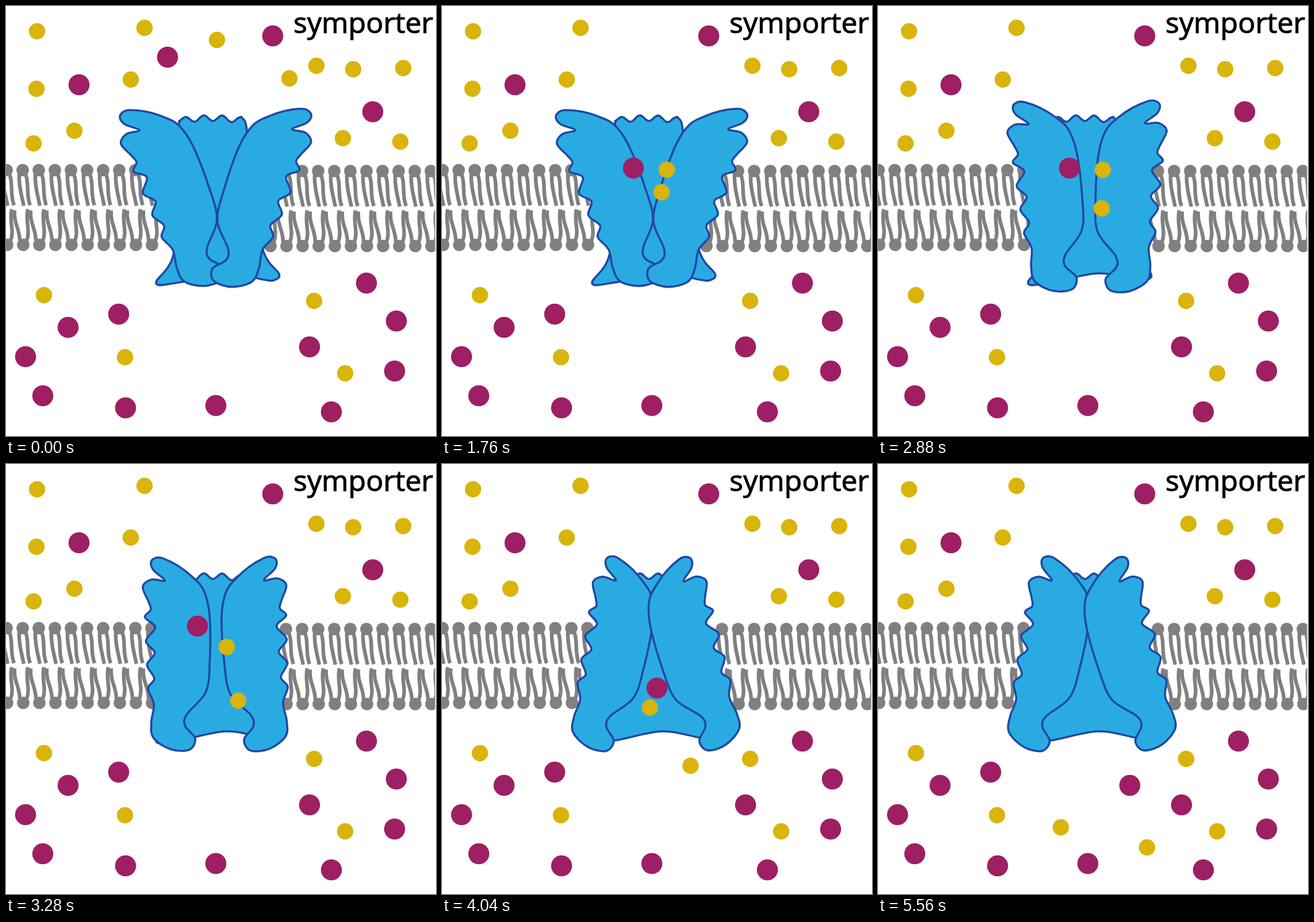
Recreate the animation shown at these times as an HTML page. Size 748x748 px, loop 6960 ms.

```html
<!DOCTYPE html>
<html lang="en">
<head>
<meta charset="utf-8">
<title>Symporter</title>
<style>
  html, body { margin: 0; width: 100%; height: 100%; overflow: hidden; background: #fff; }
  svg { display: block; width: 100%; height: 100%; }
  .protein path { fill: #29abe2; stroke: #1f48a3; stroke-width: 3.6; stroke-linejoin: round; }
  .tail { fill: none; stroke: #808080; stroke-width: 6.4; }
  .head { fill: #808080; }
  .solute { fill: #9e1f63; }
  .ion { fill: #d9b40b; }
  text { font: 50px "Open Sans", "Noto Sans", sans-serif; stroke: #000; stroke-width: 1.1; }
</style>
</head>
<body>
<svg viewBox="0 0 748 748">
  <g id="membrane"></g>
  <rect x="746.5" width="2" height="748" fill="#fff"/>
  <g class="protein">
    <path id="back"/>
    <path id="left"/>
    <path id="right"/>
  </g>
  <g id="balls"></g>
  <text x="621.5" y="46.5" text-anchor="middle">symporter</text>
</svg>
<script>
const LOOP = 6960, STEP = 40;
const $ = id => document.getElementById(id);
const range = (n, make) => Array.from({ length: n }, (_, i) => make(i));

function add(parent, tag, attrs) {
  const node = document.createElementNS('http://www.w3.org/2000/svg', tag);
  for (const key in attrs) node.setAttribute(key, attrs[key]);
  return parent.appendChild(node);
}

// Closed Catmull-Rom curve through the points
function smooth(points) {
  const n = points.length;
  const at = i => points[(i + n) % n];
  const toward = (p, from, to) => p.map((v, k) => v + (to[k] - from[k]) / 6);
  const curves = points.map((p, i) => {
    const next = at(i + 1);
    return `C${toward(p, at(i - 1), next)} ${toward(next, at(i + 2), p)} ${next}`;
  });
  return `M${points[0]}${curves.join('')}Z`;
}

// Membrane: two leaflets of lipids on each side of the protein
const TOP_TAILS = ['M-6 6C-7 24 -3 40 2 62', 'M5 7C12 24 5 40 13 61'];
const BOTTOM_TAILS = ['M-6 -7C-6 -28 -17 -38 -15 -60', 'M6 -7C13 -26 3 -40 8 -62'];

function leaflet(from, to, y, tails) {
  for (let x = from; x < to; x += 28) {
    const lipid = add($('membrane'), 'g', { transform: `translate(${x} ${y})` });
    tails.forEach(d => add(lipid, 'path', { class: 'tail', d }));
    add(lipid, 'circle', { class: 'head', r: 10.8 });
  }
}
leaflet(1, 260, 285.5, TOP_TAILS);
leaflet(2, 260, 415.5, BOTTOM_TAILS);
leaflet(487, 748, 287, TOP_TAILS);
leaflet(460, 748, 417.5, BOTTOM_TAILS);

// Protein: a fixed back and two mirrored wings that swing
const innerEdge = [
  [216, 181], [245, 184], [274, 193], [300, 207], [325, 243], [354, 318], [367, 372],
  [350, 420], [354, 440], [378, 454], [376, 476], [345, 487], [310, 479], [297, 455]
];
const outerEdge = range(4, i => 3 - i)
  .flatMap(i => [[245 + 15 * i, 298 + 42 * i], [222 + 16.3 * i, 288 + 38 * i]]);
const lobes = [[227, 272], [218, 260], [200, 240], [209, 223], [232, 216], [207, 206], [198, 194], [204, 184]];
const wing = [...innerEdge, ...outerEdge, ...lobes];

const crown = range(28, i => {
  const x = 303 + 4 * i;
  return [x, 199 - 4 * Math.sin(Math.PI * i / 27) - 5 * Math.cos(2 * Math.PI * (x - 312) / 32)];
});
const base = [
  [419, 217], [425, 330], [449, 430], [475, 466], [466, 477], [448, 476],
  [383, 465], [300, 481], [261, 482], [290, 437], [305, 330], [301, 213]
];
const MIRROR = 733.4, HINGE = [290.5, 331];

$('back').setAttribute('d', smooth([...crown, ...base]));
$('left').setAttribute('d', smooth(wing));
$('right').setAttribute('d', smooth(wing.map(([x, y]) => [MIRROR - x, y])));

// Particles
const RADIUS = { solute: 18.3, ion: 14.2 };
const ball = (kind, [cx, cy]) => add($('balls'), 'circle', { class: kind, r: RADIUS[kind], cx, cy });

[[464, 52], [127, 137], [638, 184], [627, 482], [196, 536], [108, 559], [679, 548],
 [34, 610], [528, 593], [676, 635], [64, 678], [208, 699], [365, 695], [566, 706]
].forEach(p => ball('solute', p));
[[54, 44], [241, 38], [53, 144], [217, 128], [119, 217], [48, 239], [540, 104], [604, 110],
 [691, 108], [586, 230], [686, 236], [66, 503], [536, 513], [207, 611], [590, 639]
].forEach(p => ball('ion', p));

// Each traveller binds on its first leg and is released on its second
const travellers = [
  { kind: 'ion', path: [[367, 59], [382, 324], [468, 667]], legs: [[0, 1256], [2690, 4995]] },
  { kind: 'ion', path: [[493, 126], [391, 285], [318, 632]], legs: [[0, 1620], [3040, 5540]] },
  { kind: 'solute', path: [[281, 89], [333, 282], [438, 559]], legs: [[0, 1760], [3390, 5060]] }
];
travellers.forEach(p => p.node = ball(p.kind, p.path[0]));

const progress = (t, [from, to]) => Math.min(1, Math.max(0, (t - from) / (to - from)));
const mix = (a, b, k) => a + (b - a) * k;

function draw(t) {
  const swing = progress(t, [2000, 4000]);
  const [x, y] = HINGE;
  $('left').setAttribute('transform', `rotate(${mix(0, 32.3, swing)} ${x} ${y})`);
  $('right').setAttribute('transform', `rotate(${mix(-1.75, -37.2, swing)} ${MIRROR - x} ${y})`);

  for (const { node, path, legs } of travellers) {
    const leg = t < legs[1][0] ? 0 : 1;
    const k = progress(t, legs[leg]);
    ['cx', 'cy'].forEach((key, i) => node.setAttribute(key, mix(path[leg][i], path[leg + 1][i], k)));
  }
}

const start = performance.now();
function tick() {
  const t = (performance.now() - start) % LOOP;
  draw(Math.floor(t / STEP) * STEP);
  requestAnimationFrame(tick);
}
tick();
</script>
</body>
</html>
```
